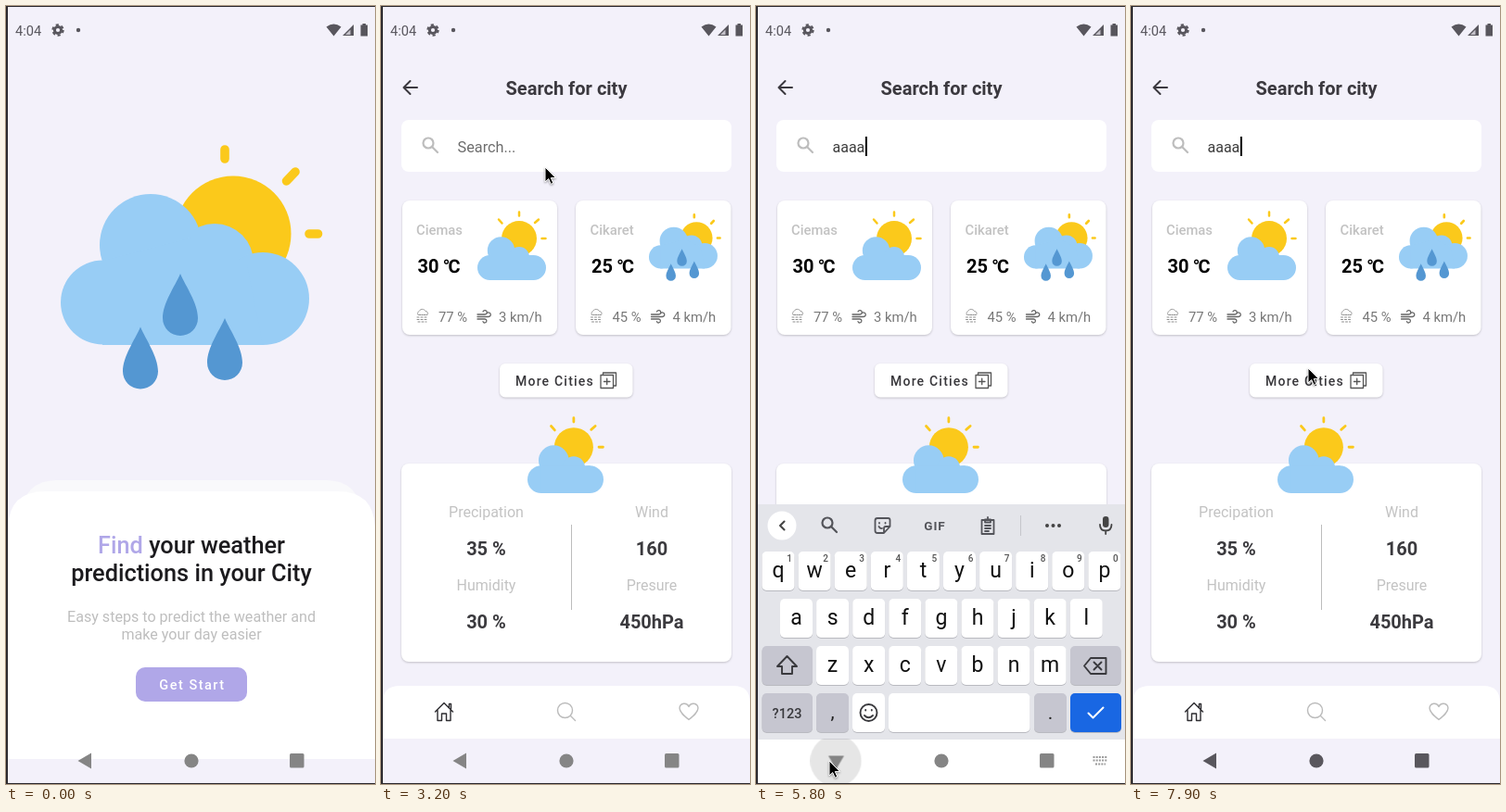
An HTML page for the animation above (8 s loop, 398 by 840 pixels).

```html
<!DOCTYPE html>
<html lang="en">
<head>
<meta charset="utf-8">
<title>Weather app</title>
<style>
html, body { margin: 0; width: 100%; height: 100%; overflow: hidden; background: #f3f1fa; }
svg { display: block; font-family: Roboto, "Noto Sans CJK JP", sans-serif; }
.mid { text-anchor: middle; }
.med { font-weight: 500; }
.bold { font-weight: 700; }
.line { fill: none; stroke-linecap: round; stroke-linejoin: round; }
.card { fill: #fff; filter: drop-shadow(0 1px 1px #0003); }
.label { font-size: 16px; fill: #c3c3c3; text-anchor: middle; }
.value { font-size: 20px; font-weight: 700; fill: #3b3a3e; text-anchor: middle; }
.small { font-size: 14.8px; fill: #777; }

/* One 8 s loop: 1.25% is 100 ms */
.fade-out, .fade-in, .keyboard, .turn, .ripple, .pointer { animation: 8s linear infinite; }
.lift, .bar, .hint, .typed, .caret-x, .blink, .tools, .chevron, .nav, .shown { animation: 8s step-end infinite; }

.fade-out { animation-name: fadeOut; }
@keyframes fadeOut { 0%, 18.75% { opacity: 1 } 22.2%, 100% { opacity: 0 } }
.fade-in { animation-name: fadeIn; }
@keyframes fadeIn { 0%, 18.75% { opacity: 0 } 22.2%, 100% { opacity: 1 } }
.lift { animation-name: lift; }
@keyframes lift { 0% { transform: none } 18.75%, 100% { transform: translateY(var(--up)) } }
.bar { animation-name: bar; }
@keyframes bar { 0% { opacity: 0 } 18.75%, 100% { opacity: 1 } }

.hint { animation-name: hint; }
@keyframes hint { 0% { opacity: 1 } 48.75%, 100% { opacity: 0 } }
.typed { animation-name: typed; }
@keyframes typed { 0% { opacity: 0 } 48.75%, 100% { opacity: 1 } }
.caret-x { animation-name: caretX; }
@keyframes caretX {
  0% { transform: none }
  48.75% { transform: translateX(8.7px) }
  51.25% { transform: translateX(17.4px) }
  56.25% { transform: translateX(26.1px) }
  57.5%, 100% { transform: translateX(34.9px) }
}
.blink { animation-name: blink; }
@keyframes blink {
  0%, 65%, 77.5%, 90% { opacity: 0 }
  42.5%, 71.25%, 83.75%, 96.25%, 100% { opacity: 1 }
}

.keyboard { animation-name: keyboard; }
@keyframes keyboard {
  0%, 44.9% { transform: translateY(302px); opacity: 0; animation-timing-function: ease-out }
  49%, 72.9% { transform: none; opacity: 1 }
  75% { transform: translateY(190px); opacity: .2 }
  76.5%, 100% { transform: translateY(302px); opacity: 0 }
}
.tools { animation-name: tools; }
@keyframes tools { 0% { opacity: 1 } 73.75%, 100% { opacity: 0 } }
.chevron { animation-name: chevron; transform-origin: 28px 561px; }
@keyframes chevron { 0% { transform: none } 73.75%, 100% { transform: scaleX(-1) } }

.nav { fill: #858585; animation-name: nav; }
@keyframes nav { 0% { fill: #858585 } 74.4%, 100% { fill: #59575d } }
.turn { animation-name: turn; transform-origin: 86.5px 815px; }
@keyframes turn {
  0%, 45% { transform: none }
  48.5%, 73.1% { transform: rotate(-90deg) }
  75% { transform: rotate(-30deg) }
  76.2%, 100% { transform: none }
}
.ripple { animation-name: ripple; transform-origin: 86px 815px; }
@keyframes ripple {
  0%, 71.2% { transform: scale(.15); opacity: 0 }
  71.25% { transform: scale(.2); opacity: .1 }
  72.5% { transform: scale(.53); opacity: .1 }
  75% { transform: none; opacity: .11 }
  77.4%, 100% { transform: none; opacity: 0 }
}

.shown { animation-name: shown; }
@keyframes shown { 0% { opacity: 0 } 1.25%, 100% { opacity: 1 } }
.pointer { animation-name: pointer; }
@keyframes pointer {
  0%, 1.25% { transform: translate(236px, 769px) }
  6%, 12% { transform: translate(196px, 737px) }
  17%, 22.5% { transform: translate(170px, 727px) }
  25% { transform: translate(130px, 600px) }
  27.5% { transform: translate(108px, 420px) }
  30% { transform: translate(150px, 226px) }
  32% { transform: translate(270px, 380px) }
  33.75%, 35% { transform: translate(352px, 492px) }
  38% { transform: translate(240px, 290px) }
  40%, 40.6% { transform: translate(177px, 174px) }
  42.5%, 59% { transform: translate(190px, 167px) }
  61% { transform: translate(150px, 500px) }
  62.5% { transform: translate(90px, 806px) }
  65% { transform: translate(69px, 811px) }
  68.75%, 73% { transform: translate(79px, 815px) }
  75% { transform: translate(97px, 757px) }
  77.5%, 78.75% { transform: translate(127px, 342px) }
  81.25%, 83% { transform: translate(117px, 313px) }
  88% { transform: translate(220px, 380px) }
  93.75% { transform: translate(315px, 446px) }
  98.5%, 100% { transform: translate(191px, 391px) }
}
</style>
</head>
<body>
<svg width="398" height="840" viewBox="0 0 398 840">
<defs>
  <path id="drop" fill="#5497d2" d="M0 0C6 14 19 32 19 48A19 19 0 0 1-19 48C-19 32-6 14 0 0Z"/>
  <g id="rain">
    <g fill="#fbc91b">
      <circle cx="245" cy="246" r="62.5"/>
      <path class="line" stroke="#fbc91b" stroke-width="9.6" d="M236 155v10M302.500 189l9.500-10M327 246h9.500"/>
    </g>
    <g fill="#98cdf5">
      <circle cx="104.500" cy="320" r="45.500"/><circle cx="156" cy="258" r="55"/>
      <circle cx="225" cy="277" r="42"/><circle cx="277" cy="316" r="50"/>
      <path d="M104 275L200 250 260 280 277 366H104Z"/>
    </g>
    <use href="#drop" x="188" y="289"/><use href="#drop" x="145" y="346.500"/><use href="#drop" x="236" y="337"/>
  </g>
  <g id="sunny">
    <circle cx="45" cy="30" r="19" fill="#fbc91b"/>
    <path class="line" stroke="#fbc91b" stroke-width="2.500" d="M45 1.500v4M23 9.500l3.500 4M66 9.500l-4 3.500M69.500 30h4"/>
    <g fill="#98cdf5">
      <circle cx="13.500" cy="61.500" r="13.500"/><circle cx="25.500" cy="43" r="14.700"/>
      <circle cx="45" cy="50" r="11"/><circle cx="60.500" cy="61.500" r="13.500"/>
      <path d="M13 48H61V75H13Z"/>
    </g>
  </g>
  <g id="drizzle" class="line" stroke="#8c8c8c">
    <path d="M-5-1.500a3 3 0 0 1 1-4A4 4 0 0 1 3-5.500a2.500 2.500 0 0 1 2 4Z" stroke-dasharray="1.500 1"/>
    <path d="M-6 1H6M-6 3.500H5M-5 6H4" stroke-dasharray="2 2"/>
  </g>
  <path id="wind" class="line" stroke="#666" stroke-width="1.300" d="M-7-2H1a2.200 2.200 0 1 0-2-3M-7 .500H5a2.300 2.300 0 1 0-2-3.500M-7 3H1a2 2 0 1 1-2 2.600"/>
  <g id="glass" class="line">
    <circle cx="-2" cy="-2" r="5.500"/><path d="M2.500 2.500L8 8"/>
  </g>
  <clipPath id="pill"><rect x="35" y="791" width="102" height="48" rx="24"/></clipPath>
</defs>

<rect width="398" height="840" fill="#f3f1fa"/>

<!-- Welcome screen -->
<g class="fade-out">
  <g class="lift" style="--up:-17px"><use href="#rain"/></g>
  <g class="lift" style="--up:-22px">
    <path fill="#f9f9fb" d="M14 552Q20 512 54 512H346Q380 512 386 552V600H14Z"/>
    <path fill="#fff" d="M2 562Q4 524 42 524H358Q396 524 398 562V813H2Z"/>
  </g>
  <g class="lift mid" style="--up:-45px">
    <g class="med" font-size="25.300" fill="#1c1b1e">
      <text x="200" y="591"><tspan fill="#b0a7e8">Find</tspan> your weather</text>
      <text x="200" y="621">predictions in your City</text>
    </g>
    <g font-size="16.100" fill="#bebebe">
      <text x="200" y="665">Easy steps to predict the weather and</text>
      <text x="200" y="684">make your day easier</text>
    </g>
    <rect x="140" y="714" width="120" height="37" rx="10" fill="#b0a7e8"/>
    <text class="med" x="201" y="738" font-size="14.500" letter-spacing="1.500" fill="#fff">Get Start</text>
  </g>
</g>

<!-- Search screen -->
<g class="fade-in">
  <path class="line" stroke="#3b393f" stroke-width="2" d="M39 88H25M31.500 81L24.500 88 31.500 95"/>
  <text class="bold mid" x="200" y="96" font-size="20" fill="#3b393f">Search for city</text>
  <rect x="22" y="123" width="356" height="56" rx="8" fill="#fff"/>
  <use href="#glass" x="53" y="150" stroke="#bdbdbd" stroke-width="2.200"/>
  <text class="hint" x="82.500" y="157.500" font-size="16.300" fill="#6d6d6d">Search...</text>
  <g class="typed">
    <text x="82.500" y="157.500" font-size="16" fill="#3c3c3c">aaaa</text>
    <rect class="caret-x" x="83" y="140" width="45" height="24" fill="#fff"/>
  </g>
  <g class="caret-x"><rect class="blink" x="83" y="141" width="2" height="21"/></g>

  <rect class="card" x="23" y="210" width="167" height="145" rx="8"/>
  <rect class="card" x="210" y="210" width="167.500" height="145" rx="8"/>
  <use href="#sunny" x="104" y="221"/>
  <use href="#rain" transform="translate(272.700 182.600) scale(.276)"/>
  <g id="cities"></g>

  <rect class="card" x="128" y="386" width="143.500" height="36.500" rx="6"/>
  <text class="med" x="145" y="410" font-size="14" letter-spacing="1.200" fill="#39383c">More Cities</text>
  <path class="line" stroke="#555" stroke-width="1.300" d="M237 398.500h13.500v14H237ZM239.500 398V396H253.500V410H251M240.500 405.500h6.500M243.700 402.200v6.500"/>

  <rect class="card" x="22" y="494" width="356" height="214" rx="8"/>
  <use href="#sunny" transform="translate(158 443) scale(1.108)"/>
  <path stroke="#bdbdbd" d="M205.500 560V652"/>
  <g id="stats"></g>
</g>
<g class="bar">
  <path fill="#fff" d="M2 791V752Q2 734 20 734H380Q398 734 398 752V791Z"/>
  <g class="line" stroke="#2d2c30" stroke-width="1.400">
    <path d="M58.500 762L68 752.500 77.500 762M61 760.500V771.500H65.500V764H70.500V771.500H75V760.500M73.500 757.500V753.500H75.500V759"/>
  </g>
  <g class="line" stroke="#bbb" stroke-width="1.400">
    <circle cx="198.500" cy="760.500" r="8"/><path d="M204.500 766.500L209.500 771.500"/>
    <path d="M332 770.500C327 766.500 322 762.500 322 758A5.200 5.200 0 0 1 332 756.500 5.200 5.200 0 0 1 342 758C342 762.500 337 766.500 332 770.500Z"/>
  </g>
</g>

<!-- Keyboard -->
<g class="keyboard">
  <rect x="2" y="538" width="396" height="254" fill="#e4e5ea"/>
  <rect x="2" y="792" width="396" height="48" fill="#fff"/>
  <circle cx="28" cy="561" r="15.500" fill="#fff"/>
  <path class="line chevron" stroke="#444" stroke-width="2" d="M30.500 556.500L26 561 30.500 565.500"/>
  <g class="tools">
    <use href="#glass" x="79" y="560" stroke="#53545a" stroke-width="2.200"/>
    <g class="line" stroke="#53545a" stroke-width="1.800">
      <path d="M131 553H142.500Q144.500 553 144.500 555V562L138 569H131Q128.500 569 128.500 566.500V555.500Q128.500 553 131 553ZM144 562H140Q138 562 138 564V568M133 558v.500M139.500 558v.500M132.500 562Q134 564.500 136 564"/>
      <path d="M243.500 555H256.500V570H243.500ZM247 554.500H253V557.500H247ZM250 552v1M247 561H253M247 564H253M247 567H251"/>
    </g>
    <text class="bold mid" x="193" y="566" font-size="13.500" letter-spacing="1" fill="#53545a">GIF</text>
    <path stroke="#c5c6cb" d="M285.500 550V572"/>
    <g fill="#444"><circle cx="314" cy="561" r="2"/><circle cx="320.500" cy="561" r="2"/><circle cx="327" cy="561" r="2"/></g>
  </g>
  <rect x="374" y="551" width="6.500" height="12" rx="3.200" fill="#444"/>
  <path class="line" stroke="#444" stroke-width="1.800" d="M371 560Q371 566.500 377.200 566.500T383.500 560M377.200 567V570"/>
  <g id="keys"></g>
  <g class="line" stroke="#39393d" stroke-width="1.900">
    <path d="M33.500 702L44 713H39V721H28V713H23Z"/>
    <path d="M361 704H377.500V721H361L354 712.500ZM364.500 708.500l8 8M372.500 708.500l-8 8"/>
    <circle cx="121.500" cy="763" r="9"/><path d="M118.200 760v.600M124.800 760v.600M117 766Q121.500 770.500 126 766"/>
  </g>
  <path class="line" stroke="#fff" stroke-width="2" d="M358.500 763.500L363.500 768.500 374.500 757.500"/>
  <path stroke="#999" stroke-width="2" stroke-dasharray="2 1.200" d="M363.500 811H379M363.500 814.500H379M366 818.500H377"/>
</g>

<!-- System bars -->
<g clip-path="url(#pill)"><circle class="ripple" cx="86" cy="815" r="52"/></g>
<g class="nav">
  <path class="turn" d="M77.500 815L92 806.500V823.500Z"/>
  <circle cx="200" cy="815" r="7.600"/>
  <rect x="306" y="807" width="15.500" height="15.500" rx="1.500"/>
</g>
<g fill="#58565d">
  <text x="10" y="31.500" font-size="14.600">4:04</text>
  <circle cx="56" cy="26" r="3.600" fill="none" stroke="#58565d" stroke-width="3"/>
  <circle cx="56" cy="26" r="5.700" fill="none" stroke="#58565d" stroke-width="2" stroke-dasharray="3.200 2.770"/>
  <circle cx="78" cy="26" r="2.200"/>
  <path d="M345.500 22.500Q353.500 16.500 361.500 22.500L353.500 32.500ZM375 20V32H363ZM382.500 20.500H384.500V19H388V20.500H390V32.500H382.500Z"/>
  <path fill="#f3f1fa" d="M369.500 27.500L371.500 25.500V31H366Z" opacity=".7"/>
</g>
<path fill="#2b292e" d="M0 0H398V1H2V839H398V840H0Z"/>

<g class="shown"><g class="pointer">
  <path d="M0 0V16L3.700 12.600 6.200 18.300 8.800 17.200 6.300 11.600H11.500Z" stroke="#fff" stroke-width="1" style="filter:drop-shadow(0 1px 1px #0006)"/>
</g></g>
</svg>

<script>
const fill = (id, markup) => document.getElementById(id).innerHTML = markup;
const text = (cls, x, y, str, extra = '') => `<text class="${cls}" x="${x}" y="${y}" ${extra}>${str}</text>`;

const city = (x, name, temp, wet, wind) =>
  text('med', x + 38, 247, name, 'font-size="14.8" fill="#c2c2c2"') +
  text('bold', x + 39.5, 288, temp + ' ℃', 'font-size="20"') +
  text('small', x + 62, 340.5, wet + ' %') +
  text('small', x + 127, 340.5, wind + ' km/h') +
  `<use href="#drizzle" x="${x + 45}" y="335"/><use href="#wind" x="${x + 111}" y="335"/>`;
fill('cities', city(0, 'Ciemas', 30, 77, 3) + city(187.5, 'Cikaret', 25, 45, 4));

const stat = (x, y, label, value) => text('label', x, y, label) + text('value', x, y + 41.5, value);
fill('stats',
  stat(113.5, 551.5, 'Precipation', '35 %') + stat(292, 551.5, 'Wind', '160') +
  stat(113.5, 630.5, 'Humidity', '30 %') + stat(292, 630.5, 'Presure', '450hPa'));

const key = (x, y, w, color = '#fff') =>
  `<rect x="${x}" y="${y + 1}" width="${w}" height="42" rx="5" fill="#b9bac0"/>
   <rect x="${x}" y="${y}" width="${w}" height="42" rx="5" fill="${color}"/>`;
const row = (letters, x, y, hints) => [...letters].map((c, i) => {
  const left = x + i * 39.1;
  return key(left, y, 35) + text('mid', left + 17.5, y + 28, c, 'font-size="23" fill="#111"') +
    (hints ? text('mid med', left + 29.5, y + 11, (i + 1) % 10, 'font-size="10" fill="#555"') : '');
}).join('');
const grey = '#c6c6d0';
fill('keys',
  row('qwertyuiop', 6.5, 589, true) + row('asdfghjkl', 26, 640) + row('zxcvbnm', 65, 691) +
  key(6.5, 691, 54.5, grey) + key(339, 691, 54.5, grey) +
  key(6.5, 742, 54.5, grey) + key(65, 742, 35, grey) + key(104, 742, 35) +
  key(143, 742, 152.5) + key(300, 742, 35, grey) + key(339, 742, 55, '#1967e3') +
  text('mid med', 33.5, 769, '?123', 'font-size="14.5" fill="#39393d"') +
  text('mid', 82.5, 769, ',', 'font-size="21" fill="#222"') +
  text('mid', 317.5, 770, '.', 'font-size="21" fill="#222"'));
</script>
</body>
</html>
```
